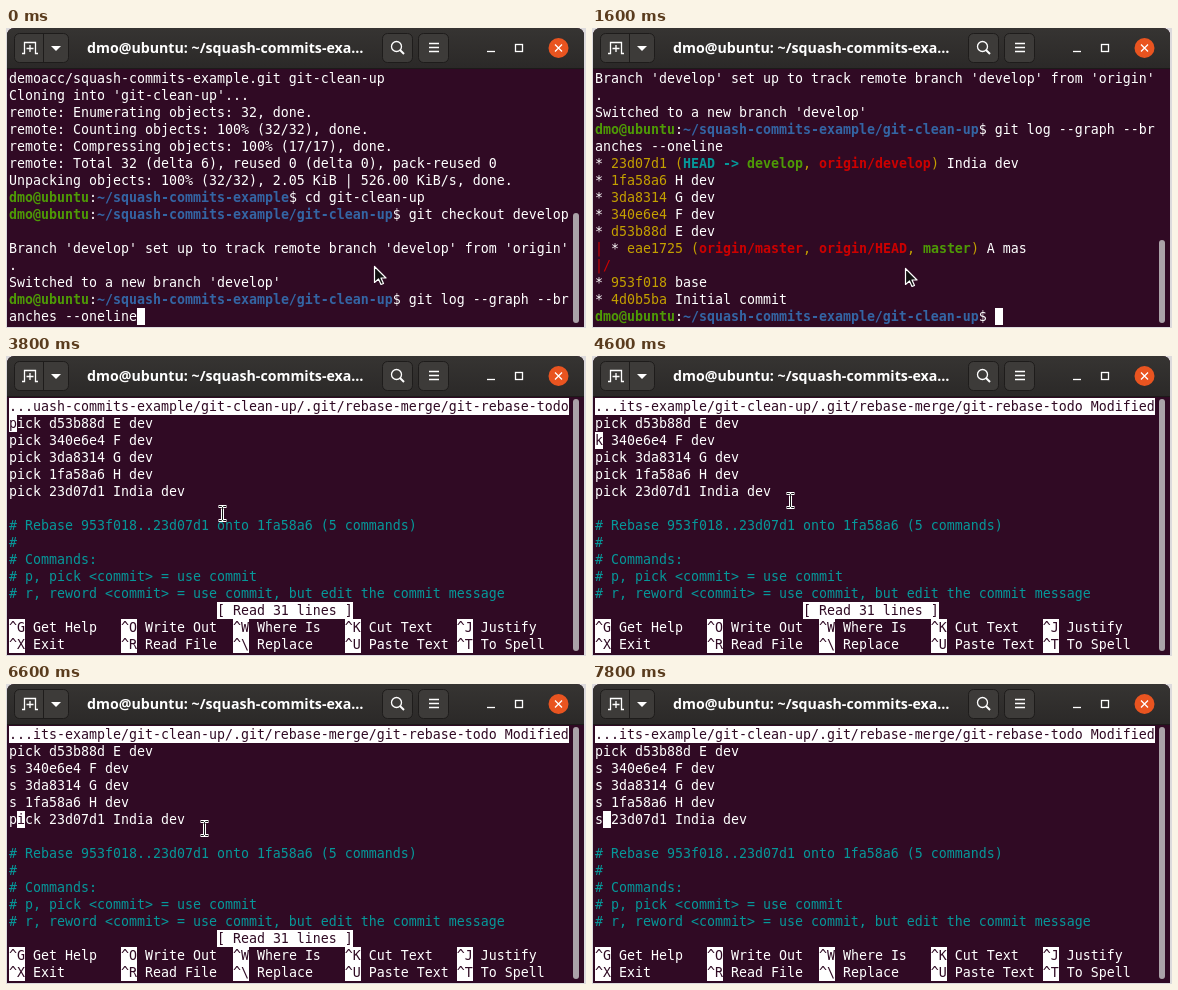
Animation, 580 px wide and 300 px high, one loop 8000 ms. Source, as an HTML page:

```html
<!DOCTYPE html>
<html lang="en">
<head>
<meta charset="utf-8">
<title>Squashing commits</title>
<style>
  html, body { margin: 0; width: 100%; height: 100%; overflow: hidden; background: #dcdadc; }
  #stage { position: relative; width: 580px; height: 300px; overflow: hidden; }
  svg { position: absolute; left: 0; top: 0; }
  #screen {
    position: absolute; left: 3px; top: 42px; width: 562px; height: 255px; margin: 0;
    font: 13.29px/17px "DejaVu Sans Mono", monospace; color: #fff; overflow: hidden;
  }
  #title { font: bold 14.2px "Noto Sans", "Open Sans", sans-serif; fill: #fff; }
  .user { color: #4e9a06; font-weight: bold; }
  .path { color: #3465a4; font-weight: bold; }
  .head { color: #06989a; font-weight: bold; }
  .remote { color: #cc0000; font-weight: bold; }
  .graph { color: #cc0000; }
  .hash { color: #c4a000; }
  .note { color: #06989a; }
  .inv { display: inline-block; height: 17px; vertical-align: top; background: #fff; color: #300a24; }
</style>
</head>
<body>
<div id="stage">
  <svg width="580" height="300">
    <defs>
      <linearGradient id="bar" x2="0" y2="1">
        <stop stop-color="#363432"/><stop offset="1" stop-color="#2b2928"/>
      </linearGradient>
    </defs>
    <path d="M1 299V8q0-8 8-8H570q8 0 8 8V299z" fill="#300a24"/>
    <path d="M1 40V8q0-8 8-8H570q8 0 8 8V40z" fill="url(#bar)"/>
    <path d="M1 40.5H578" stroke="#1c1a19"/>
    <g fill="#3d3b39" stroke="#1e1c1b">
      <rect x="8.500" y="5.500" width="54" height="29" rx="5"/>
      <path d="M37.500 6V34"/>
      <rect x="376.500" y="5.500" width="30" height="29" rx="5"/>
      <rect x="412.500" y="5.500" width="30" height="29" rx="5"/>
    </g>
    <g fill="none" stroke="#fff" stroke-width="1.300">
      <path d="M16 25.500H18.500V14.500H29.500V25.500H32M24 17V24M20.500 20.500H27.500"/>
      <circle cx="390.500" cy="18.500" r="5"/>
      <path d="M394 22L398 26" stroke-width="2"/>
      <path d="M423 15.500H433M423 19.500H433M423 23.500H433"/>
      <path d="M481 23.500H489"/>
      <rect x="509.500" y="16.500" width="7" height="7"/>
    </g>
    <path d="M45 18H55L50 23z" fill="#fff"/>
    <circle cx="552.500" cy="20" r="10" fill="#e95420"/>
    <path d="M549 16.500L556 23.500M556 16.500L549 23.500" stroke="#fff" stroke-width="1.300"/>
    <text id="title" x="81" y="25">dmo@ubuntu: ~/squash-commits-exa…</text>
    <rect id="scroll" x="567" width="6" rx="3" fill="#aaa2a8"/>
  </svg>
  <pre id="screen"></pre>
  <svg width="580" height="300">
    <path id="arrow" d="M0 0V16L4 12.500L6.500 18L9 17L6.500 11.500H11.500z"
      fill="#111" stroke="#fff" stroke-width="1.200" stroke-linejoin="round"/>
    <g id="beam" fill="none">
      <path d="M-4 -7H-1L0 -6L1 -7H4M0 -6V6M-4 7H-1L0 6L1 7H4" stroke="#fff" stroke-width="3"/>
      <path d="M-3.500 -7H-1L0 -6L1 -7H3.500M0 -6V6M-3.500 7H-1L0 6L1 7H3.500" stroke="#111"/>
    </g>
  </svg>
</div>
<script>
const LOOP = 8000, TICK = 200, ROWS = 15;
const $ = id => document.getElementById(id);
const esc = s => s.replace(/&/g, '&amp;').replace(/</g, '&lt;');
const paint = (kind, s) => `<span class="${kind}">${esc(s)}</span>`;
const hash = s => paint('hash', s);
const remote = s => paint('remote', s);
const block = (on, s = ' ') => on ? paint('inv', s) : s;

const repo = '~/squash-commits-example';
const prompt = (path, command = '') =>
  paint('user', 'dmo@ubuntu') + ':' + paint('path', path) + '$ ' + command;
const inRepo = command => prompt(repo + '/git-clean-up', command);
const commits = ['d53b88d E dev', '340e6e4 F dev', '3da8314 G dev', '1fa58a6 H dev', '23d07d1 India dev'];
const logLine = s => '* ' + hash(s.slice(0, 7)) + s.slice(7);

const shell = [
  'demoacc/squash-commits-example.git git-clean-up',
  "Cloning into 'git-clean-up'...",
  'remote: Enumerating objects: 32, done.',
  'remote: Counting objects: 100% (32/32), done.',
  'remote: Compressing objects: 100% (17/17), done.',
  'remote: Total 32 (delta 6), reused 0 (delta 0), pack-reused 0',
  'Unpacking objects: 100% (32/32), 2.05 KiB | 526.00 KiB/s, done.',
  prompt(repo, 'cd git-clean-up'),
  inRepo('git checkout develop'),
  '',
  "Branch 'develop' set up to track remote branch 'develop' from 'origin'",
  '.',
  "Switched to a new branch 'develop'",
  inRepo('git log --graph --br'),
  'anches --oneline',
  '* ' + hash('23d07d1 (') + paint('head', 'HEAD -> ') + paint('user', 'develop') + hash(', ') +
    remote('origin/develop') + hash(')') + ' India dev',
  ...commits.slice(0, 4).reverse().map(logLine),
  paint('graph', '|') + ' * ' + hash('eae1725 (') + remote('origin/master') + hash(', ') +
    remote('origin/HEAD') + hash(', ') + paint('user', 'master') + hash(')') + ' A mas',
  paint('graph', '|/'),
  ...['953f018 base', '4d0b5ba Initial commit'].map(logLine)
];

function shellView(t) {
  if (t < 400) return [...shell.slice(0, 14), shell[14] + block(true)];
  if (t < 2000) {
    const cursorOn = t < 800 || t >= 1400;
    return [...shell.slice(10), inRepo() + block(cursorOn)];
  }
  return [...shell.slice(11), inRepo('git rebase --interac'), 'tive HEAD~5' + block(true)];
}

// time, edited line, its command, cursor column
const edits = [
  [3800, 0, 'pick', 0], [4000, 1, 'pick', 0], [4200, 1, 'ick', 0], [4400, 1, 'ck', 0],
  [4600, 1, 'k', 0], [4800, 1, '', 0], [5000, 1, 's', 1],
  [5200, 2, 'pick', 1], [5400, 2, '', 0], [5600, 2, 's', 1],
  [5800, 3, 'pick', 1], [6000, 3, 'p', 1], [6200, 3, '', 0], [6400, 3, 's', 1],
  [6600, 4, 'pick', 1], [6800, 4, 'pck', 1], [7000, 4, 'pk', 1], [7200, 4, 'p', 1],
  [7600, 4, '', 0], [7800, 4, 's', 1]
];

// time, pointer kind, x, y
const pointers = [
  [0, 'arrow', 368.5, 238.5], [600, 'arrow', 345.5, 241.5], [1600, 'arrow', 313.5, 240.5],
  [3800, 'beam', 216.5, 157.5], [4200, 'beam', 198.5, 144.5], [7400, 'none', 0, 0]
];

const latest = (table, t) => table.filter(step => step[0] <= t).pop();

const keys = list => list.map(([key, label], i) =>
  paint('inv', key) + (' ' + label).padEnd(i < 4 ? 12 : 0)).join('');

function editorView(t) {
  const [, row, command, col] = latest(edits, t);
  const todo = commits.map((commit, i) => {
    if (i !== row) return (i === 0 || i > row ? 'pick ' : 's ') + commit;
    const line = command + ' ' + commit;
    return line.slice(0, col) + block(true, line[col]) + line.slice(col + 1);
  });
  const file = '/git-clean-up/.git/rebase-merge/git-rebase-todo';
  const header = t < 4200 ? '...uash-commits-example' + file : '...its-example' + file + ' Modified';
  const notes = [
    '# Rebase 953f018..23d07d1 onto 1fa58a6 (5 commands)',
    '#',
    '# Commands:',
    '# p, pick <commit> = use commit',
    '# r, reword <commit> = use commit, but edit the commit message'
  ];
  return [
    paint('inv', header), ...todo, '',
    ...notes.map(s => paint('note', s)),
    t < 7200 ? ' '.repeat(26) + paint('inv', '[ Read 31 lines ]') : '',
    keys([['^G', 'Get Help'], ['^O', 'Write Out'], ['^W', 'Where Is'], ['^K', 'Cut Text'], ['^J', 'Justify']]),
    keys([['^X', 'Exit'], ['^R', 'Read File'], ['^\\', 'Replace'], ['^U', 'Paste Text'], ['^T', 'To Spell']])
  ];
}

function render(t) {
  const lines = t < 3800 ? shellView(t) : editorView(t);
  $('screen').innerHTML = lines.slice(0, ROWS).join('\n');

  const top = t < 400 ? 185 : t < 3800 ? 212 : 43;
  $('scroll').setAttribute('y', top);
  $('scroll').setAttribute('height', 295 - top);

  const [, kind, x, y] = latest(pointers, t);
  for (const id of ['arrow', 'beam']) {
    $(id).setAttribute('visibility', id === kind ? 'visible' : 'hidden');
    $(id).setAttribute('transform', `translate(${x} ${y})`);
  }
}

const start = performance.now();
let shown = -1;
function frame() {
  const t = Math.floor((performance.now() - start) % LOOP / TICK) * TICK;
  if (t !== shown) render(shown = t);
  requestAnimationFrame(frame);
}
frame();
</script>
</body>
</html>
```
